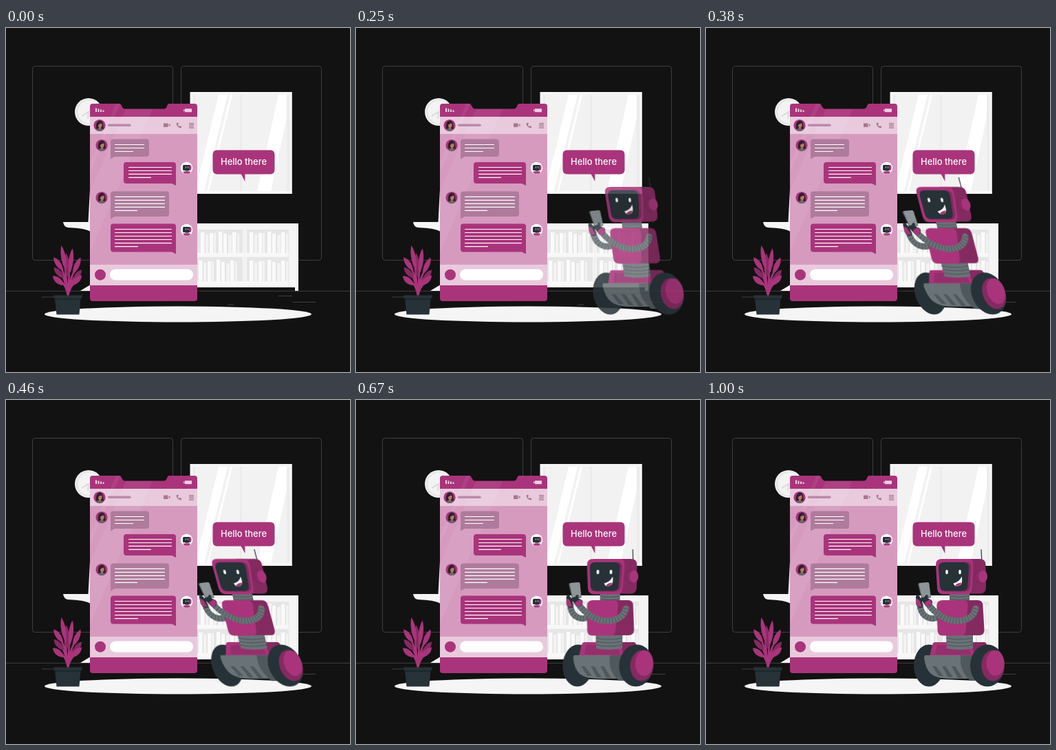
An HTML page without scripts for the animation above (1.04 s loop, 500 by 500 pixels).

```html
<!DOCTYPE html>
<html lang="en">
<head>
<meta charset="utf-8">
<title>Chat robot</title>
<style>
  html, body { margin: 0; width: 100%; height: 100%; overflow: hidden; background: #121212; }
  svg { display: block; width: 100vw; height: 100vh; }
  .pink { fill: #a9347b; }
  .plum { fill: #852a61; }
  .ink { fill: #263238; }
  .steel { fill: #697276; }
  .iron { fill: #4f595d; }
  .line { fill: none; stroke: #4b4b4b; stroke-width: .8; }
  .text { fill: none; stroke: #fff; stroke-width: 1.2; stroke-linecap: round; }
  .tube { fill: none; stroke: #697276; stroke-width: 9; stroke-linecap: round; }
  .ribs { fill: none; stroke: #4a5458; stroke-width: 9; stroke-dasharray: .9 3.6; }
  .hello { font: 500 12.9px Inter, "Open Sans", sans-serif; fill: #fff; text-anchor: middle; }

  .robot {
    transform-origin: 368px 317px;
    animation: arrive 1040ms cubic-bezier(.333, .833, .667, 1.252) infinite;
  }
  @keyframes arrive {
    0% { transform: translateX(250px) skewX(-20deg); opacity: 0; }
    52.9% { transform: translateX(0) skewX(10deg); opacity: 1; }
    74.5% { transform: translateX(0) skewX(-2deg); opacity: 1; }
    96.15%, 100% { transform: translateX(0) skewX(0deg); opacity: 1; }
  }
</style>
</head>
<body>
<svg viewBox="0 0 500 500">
  <defs>
    <path id="leaf" d="M0 0C-5 -9 -5 -22 0 -30C5 -22 5 -9 0 0Z"/>
    <g id="woman">
      <circle r="8.6" class="pink"/>
      <path d="M-5 5C-6 -2 -4 -7 1 -7C6 -6 5 1 6 5Z" fill="#2b2030"/>
      <path d="M-4.500 7.200C-3 4 3 4 5 7A8.600 8.600 0 0 1 -4.500 7.200Z" fill="#5d6b70"/>
      <path d="M-1.200 2H2V5.500H-1.200Z" fill="#a06a50"/>
      <ellipse cx=".8" cy="-.6" rx="2.800" ry="3.900" fill="#b67a5c"/>
      <path d="M-3 1C-3 -4 -1 -6 4 -3C1 -3 -1 -2 -3 1Z" fill="#2b2030"/>
    </g>
    <g id="bot">
      <circle r="8.700" fill="#fff"/>
      <rect x="-5.500" y="-4.500" width="11" height="8" rx="1.500" class="ink"/>
      <path d="M4 -4.500H5Q7 -4 7 -1Q7 3 5 3.500H4Z" class="pink"/>
      <path d="M-1 -2V0M2 -2V0" stroke="#fff" stroke-width=".8"/>
      <path d="M-2 3.500H3V5H-2Z" class="steel"/>
      <path d="M-5 5H5.500L4.500 7.400Q0 9.200 -4 7.400Z" class="pink"/>
    </g>
    <g id="books">
      <path d="M4 4h6v30h-6zM17 5h5v29h-5zM30 3h6v31h-6zM37 6h5v28h-5zM50 4h6v30h-6z" fill="#fafafa"/>
      <path d="M11 7h5v27h-5zM23 5h4v29h-4zM44 8h5v26h-5zM57 6h3v28h-3z" fill="#f3f3f3"/>
      <path d="M10 5v29M16 7v27M27 4v30M36 4v30M43 6v28M56 5v29" stroke="#dcdcdc" stroke-width=".8"/>
    </g>
  </defs>

  <rect width="500" height="500" fill="#121212"/>
  <g class="line">
    <rect x="38.500" y="55.500" width="204" height="282" rx="4"/>
    <rect x="254.500" y="55.500" width="204" height="282" rx="4"/>
    <path d="M0 382.400H500M52 391H82M396 389.500H416M417 398.500H450M322 402H331"/>
  </g>

  <!-- window -->
  <rect x="267.500" y="93" width="148.300" height="148" fill="#f5f5f5"/>
  <path d="M272 97H412V237H272Z" fill="#ececec"/>
  <path d="M275 97H340V237H275ZM343 97H408V237H343Z" fill="#f2f2f2"/>
  <path d="M309 97H322L288 237H275ZM326 97H329L295 237H292ZM396 97H408V130L385 237H365Z" fill="#fff"/>
  <path d="M268 237.500H415.500V241H268Z" fill="#fff"/>

  <!-- bookcase -->
  <path d="M270 284H425V382H420V377H411V377H270Z" fill="#f5f5f5"/>
  <path d="M274 293H344V327H274ZM350 293H411V327H350ZM274 333H344V368H274ZM350 333H411V368H350Z" fill="#e6e6e6"/>
  <use href="#books" x="279" y="293"/>
  <use href="#books" x="350" y="293"/>
  <use href="#books" x="276" y="334"/>
  <use href="#books" x="350" y="334"/>
  <path d="M270 327H411V332H270ZM270 368H411V376.500H270Z" fill="#f8f8f8"/>
  <path d="M411 293V377M347 293V368" stroke="#ebebeb"/>

  <!-- clock, desk, rug -->
  <circle cx="120" cy="122" r="20" fill="#f0f0f0"/>
  <circle cx="120" cy="122" r="18" fill="#e4e4e4"/>
  <circle cx="121" cy="122" r="16.700" fill="#f3f3f3"/>
  <path d="M110 128L120 122L119 132" fill="none" stroke="#dadada" stroke-width="2"/>
  <path d="M83 282H123V296C112 290 99 291 90 290Q84 289 83 282ZM122 235L119.500 282H123ZM108 382L123 373V382Z" fill="#f5f5f5"/>
  <ellipse cx="250" cy="416" rx="194" ry="11.500" fill="#f5f5f5"/>

  <!-- phone -->
  <path d="M126 110H165Q167 110 168 113T172 117.500H230Q233 117 234 113.500T237 110H274Q278 110 278 114V393Q278 397 274 397H126Q122 397 122 393V114Q122 110 126 110Z" class="pink"/>
  <path d="M122 154H278V344H122Z" fill="#d69abf"/>
  <path d="M122 129H278V154H122ZM122 344H278V374H122Z" fill="#e9cadd"/>
  <path d="M174 118H213L122 326V237ZM160 110H166L122 211V197Z" fill="#fff" opacity=".06"/>
  <path d="M130 116.500h2v5.500h-2zM133.500 117.500h2v4.500h-2zM137 118.500h2v3.500h-2zM140.500 119.500h2v2.500h-2zM260 117.200h10v5h-10zM258 118.500h1.500v2.500h-1.500z" fill="#ecd0e1"/>
  <path d="M149.500 141.300H180" stroke="#b98aaa" stroke-width="3.400" stroke-linecap="round"/>
  <g fill="#a57895">
    <path d="M229 138.500h6.500v5.500h-6.500zM236 141l2.500-2v4.500z"/>
    <path d="M247.500 138.500C248 143 251 145.500 255 145.300V143L252.800 142L251.500 143C250.500 142.500 250 141.500 249.800 140.500L251 139.500L250 137.500Z"/>
    <path d="M266 138h7v1.200h-7zM266 140.200h7v1.200h-7zM266 142.400h7v1.200h-7zM266 144.600h7v1.200h-7z"/>
  </g>
  <use href="#woman" x="136" y="141.500"/>
  <use href="#woman" x="139" y="170.500"/>
  <use href="#woman" x="139" y="246.500"/>
  <use href="#bot" x="262.500" y="203.500"/>
  <use href="#bot" x="262.500" y="293.500"/>
  <g fill="#ae7b9c">
    <path d="M156 161.500H204Q208 161.500 208 165.500V183Q208 187 204 187H158L152 190.500V165.500Q152 161.500 156 161.500Z"/>
    <path d="M156 237.500H233Q237 237.500 237 241.500V270Q237 274 233 274H158L152 277.500V241.500Q152 237.500 156 237.500Z"/>
  </g>
  <g class="pink">
    <path d="M175 195H243Q247 195 247 199V229L241 226H175Q171 226 171 222V199Q171 195 175 195Z"/>
    <path d="M156 284.500H243Q247 284.500 247 288.500V328.500L241 325.500H156Q152 325.500 152 321.500V288.500Q152 284.500 156 284.500Z"/>
  </g>
  <path class="text" d="M158.500 169.500h42M158.500 174.500h42M158.500 179.500h26M178.500 202.500h62M178.500 207.500h62M178.500 212.300h62M178.500 217.300h32M158.500 245.300h72M158.500 250.300h72M158.500 255.300h72M158.500 260.300h72M158.500 265.300h32M158.500 292.500h82M158.500 297.500h82M158.500 302.500h82M158.500 307.500h82M158.500 312.600h82M158.500 317.600h33"/>
  <circle cx="137" cy="358.700" r="8" class="pink"/>
  <rect x="151" y="350.500" width="121" height="16" rx="8" fill="#fff"/>

  <!-- plant -->
  <path d="M90 389L86 350M90 389L92 352M90 389Q88 365 80 348M90 389Q88 369 80 358M90 389Q88 375 80 368M90 389Q92 365 100 352M90 389Q93 373 99 362M90 389Q92 378 100 370" fill="none" stroke="#a9347b" stroke-width="2.600"/>
  <g class="plum">
    <use href="#leaf" transform="translate(90 363) rotate(-4) scale(1 1.200)"/>
    <use href="#leaf" transform="translate(84 364) rotate(-42) scale(1 .72)"/>
    <use href="#leaf" transform="translate(97 368) rotate(38) scale(1 .7)"/>
  </g>
  <g class="pink">
    <use href="#leaf" transform="translate(87 353) rotate(-10) scale(.9 1.250)"/>
    <use href="#leaf" transform="translate(92 358) rotate(7) scale(.9 1.270)"/>
    <use href="#leaf" transform="translate(83 353) rotate(-35) scale(1 .8)"/>
    <use href="#leaf" transform="translate(84 374) rotate(-50) scale(1.100 .7)"/>
    <use href="#leaf" transform="translate(97 358) rotate(25) scale(1 .9)"/>
    <use href="#leaf" transform="translate(95 374) rotate(46) scale(1.100 .7)"/>
    <path d="M86 372Q90 380 96 372L91 389H89Z"/>
  </g>
  <path class="ink" d="M69 388.500H111L110 393H108.500L106.500 416.500H73.500L71 393H70Z"/>
  <path d="M70.500 393H109L108.800 395H71.200Z" fill="#1c262b"/>

  <!-- speech bubble -->
  <rect x="300.500" y="177.500" width="90" height="35" rx="6" class="pink"/>
  <path d="M341 211L347.300 223V211Z" class="pink"/>
  <text class="hello" x="345.500" y="199">Hello there</text>

  <g class="robot">
    <!-- far arm -->
    <path class="tube" d="M340 315C325 322 312 314 311 297"/>
    <path class="ribs" d="M340 315C325 322 312 314 311 297"/>

    <!-- base -->
    <ellipse cx="324" cy="386" rx="22" ry="30.500" class="ink"/>
    <path d="M333 352H404Q407 352 408 356L412 373H325L329 356Q330 352 333 352Z" class="pink"/>
    <path d="M386 352H404Q407 352 408 356L412 373H390Z" class="plum"/>
    <path d="M336 356H381L385 370H333Z" class="plum" opacity=".55"/>
    <path d="M318 371H400V405H352Q336 405 327 398Q319 391 317 375Z" class="steel"/>
    <path d="M370 371H408V408H384Q372 397 370 383Z" class="iron"/>
    <path d="M329 387h5l11 14h-7zM343 387h5l11 16h-7zM357 387h5l11 17h-7z" class="iron"/>
    <ellipse cx="409" cy="386" rx="25" ry="30.500" class="ink"/>
    <ellipse cx="417" cy="386" rx="16.800" ry="22.500" class="plum"/>
    <ellipse cx="420.500" cy="382.500" rx="13" ry="18.500" class="pink"/>

    <!-- waist and neck -->
    <path d="M349 341H388V361Q368 365 350 361Z" class="steel"/>
    <path d="M349 346Q368 350 388 346M349 351Q368 355 388 351M350 356Q368 360 388 356" fill="none" stroke="#4a5458"/>
    <path d="M354 280H383V293H354Z" class="steel"/>
    <path d="M354 285Q368 288 383 285M354 289Q368 292 383 289" fill="none" stroke="#4a5458"/>

    <!-- chest -->
    <path d="M362 291H395Q402 291 402.500 299L404.500 334Q404.500 342 397 342H362Z" class="plum"/>
    <path d="M344 291H374Q381 291 380.500 299L377.500 335Q377 342.500 370 342.500H344Q337 342.500 336.500 335L335.500 299Q335.500 291 344 291Z" class="pink"/>

    <!-- head -->
    <path d="M400 217L401.500 248" stroke="#263238" stroke-width="1.200"/>
    <path d="M370 231H398Q406 231 406.500 239L407 272Q407 281 399 281.500H370Z" class="plum"/>
    <path d="M343 231H381Q389 231 388.500 240L386.500 274Q386 282.500 378 282.500H345Q337 282.500 336 274L334 240Q333.500 231 343 231Z" class="pink"/>
    <path d="M346 235.500H378Q386 235.500 385.500 244L384 271Q383 278.500 376 278.500H348Q340 278.500 339.500 271L338 244Q337.500 235.500 346 235.500Z" class="plum"/>
    <path d="M346 236H374Q382.500 236 382 244L380.500 270Q380 277.500 373 277.500H348Q340.500 277.500 340 270L338 244Q338 236 346 236Z" class="ink"/>
    <ellipse cx="397" cy="256.500" rx="6.500" ry="9.500" class="plum" stroke="#702250" stroke-width=".6"/>
    <ellipse cx="402.500" cy="256.500" rx="6.500" ry="9" class="pink"/>
    <ellipse cx="350" cy="250" rx="1.800" ry="3.200" fill="#fff"/>
    <ellipse cx="369" cy="250" rx="1.800" ry="3.200" fill="#fff"/>
    <path d="M359.500 266.500Q369 264 371.500 256.500Q374.500 270 364.500 271Q361 270.500 359.500 266.500Z" fill="#fff"/>
    <path d="M362 269.500Q366 265.500 371.500 265.500Q369 271 364.500 271Q363 270.800 362 269.500Z" class="pink"/>

    <!-- handset and near arm -->
    <path d="M310 266L322 265Q324 265 324.300 267L327 287L314 291L308 268Q308 266 310 266Z" fill="#4f595d"/>
    <path d="M311 266L322.500 265Q324 265 324.300 267L326.500 286L314.500 289L309.500 268Q309.500 266.500 311 266Z" fill="#8d9599"/>
    <path d="M305 287Q305 283 309 283L312 288L318 286L317 290L314 293L315 301Q308 304 305.500 297Z" class="ink"/>
    <path d="M305.500 288L310 291L314 300Q307 302 305.500 296Z" class="pink"/>
    <path class="tube" d="M392 303C388 321 366 325 347 317C335 311 329 305 323 297"/>
    <path class="ribs" d="M392 303C388 321 366 325 347 317C335 311 329 305 323 297"/>
    <path d="M314 292L320 283L323 284L322 288L328 291Q331 295 326 299L320 300Z" class="ink"/>
    <path d="M318 294L325 290Q330 293 328 297L322 301Q318 299 318 294Z" class="pink"/>
  </g>
</svg>
</body>
</html>
```
